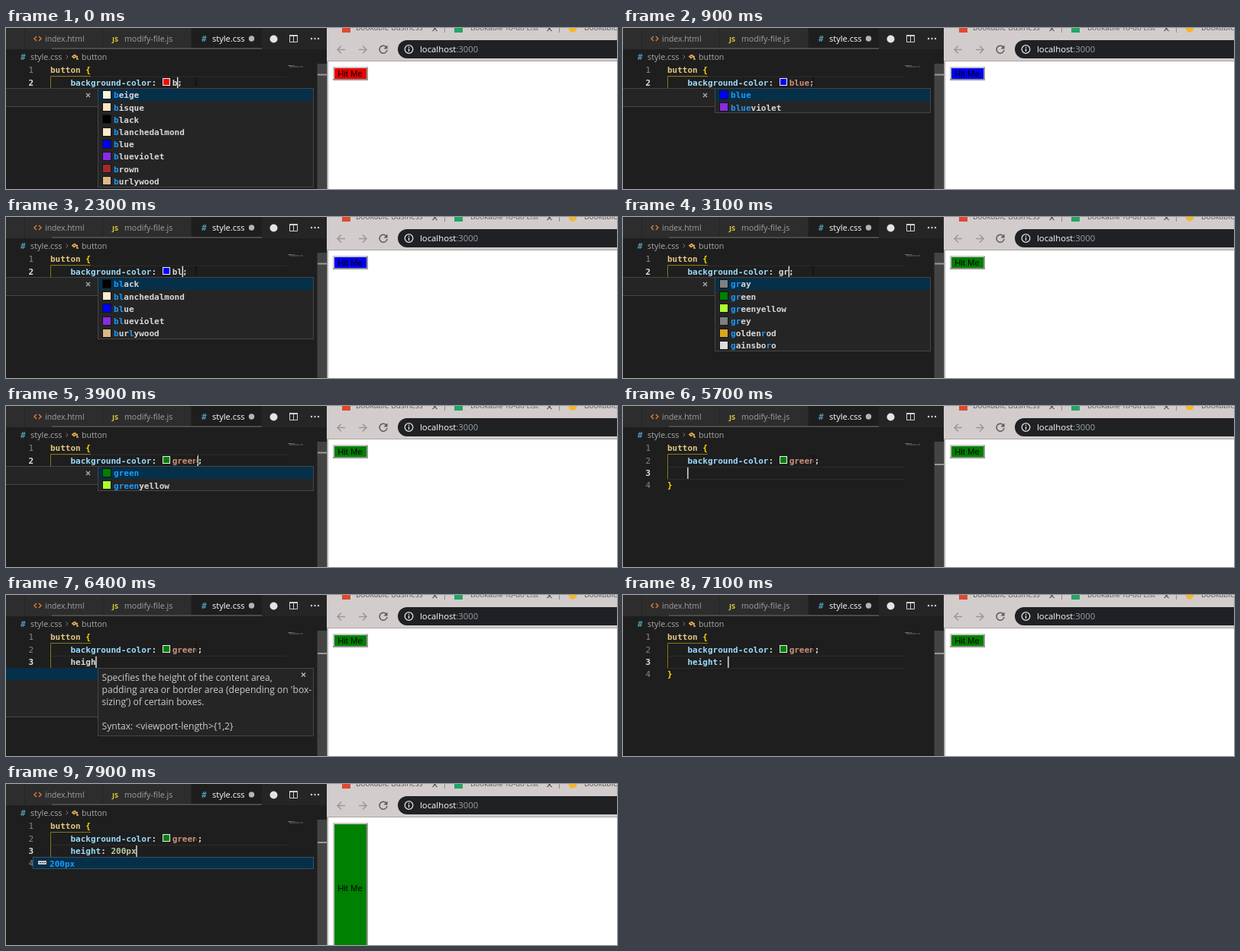
Recreate the animation shown at these times as an HTML page. Size 800x212 px, loop 8000 ms.

```html
<!DOCTYPE html>
<html lang="en">
<head>
<meta charset="utf-8">
<title>Live style editing</title>
<style>
html, body { margin: 0; width: 800px; height: 212px; overflow: hidden; background: #1e1e1e; }
svg { display: block; }
text { white-space: pre; }
.ui { font-family: "Open Sans", "Noto Sans", sans-serif; font-size: 10.6px; }
.code { font-family: "DejaVu Sans Mono", "Noto Sans Mono", monospace; font-size: 11px; font-weight: bold; }
.num { font-family: "DejaVu Sans Mono", "Noto Sans Mono", monospace; font-size: 11px; }
.page { font-family: "Liberation Sans", Arial, sans-serif; font-size: 11.33px; }
</style>
</head>
<body>
<svg id="stage" width="800" height="212" viewBox="0 0 800 212"></svg>
<script>
const LOOP = 8000, CHAR = 6.62, ROW = 16.2, LEFT = 58, INDENT = LEFT + 4 * CHAR;
const C = { plain: '#d8d8d8', prop: '#9cdcfe', value: '#ce9178', number: '#b5cea8', selector: '#e2c583',
  brace: '#ffd700', match: '#1a9bfb', widget: '#252526', edge: '#454545', selected: '#062f4a',
  toolbar: '#d2cdcc', address: '#202124' };

// Tracks: [start in ms, value]
const colorText = [[0, 'b'], [100, 'bl'], [300, 'blu'], [400, 'blue'], [2000, 'blu'], [2200, 'bl'], [2500, 'b'],
  [2800, ''], [2900, 'g'], [3100, 'gr'], [3300, 'gre'], [3400, 'gree'], [3600, 'green']];
const heightText = [[0, null], [5600, ''], [5900, 'h'], [6000, 'he'], [6200, 'hei'], [6300, 'heig'], [6400, 'heigh'],
  [6500, 'height'], [6700, 'height:'], [6900, 'height: '], [7400, 'height: 2'], [7500, 'height: 20'],
  [7600, 'height: 200'], [7700, 'height: 200p'], [7800, 'height: 200px']];
const swatchColor = [[0, 'red'], [600, 'blue'], [2600, ''], [3700, 'green']];
const buttonColor = [[0, '#e80000'], [600, '#0000f0'], [2600, '#008000']];
const buttonHeight = [[0, 18], [7700, 172]];
const popupKind = [[0, 'colors'], [2800, ''], [2900, 'colors'], [4400, ''], [5900, 'property'], [6700, ''], [7700, 'unit']];
const caretLine = [[0, 2], [4600, 3], [5100, 2], [5600, 3]];

const suggestions = {
  b: 'beige bisque black blanchedalmond blue blueviolet brown burlywood',
  bl: 'black blanchedalmond blue blueviolet burlywood',
  blu: 'blue blueviolet',
  blue: 'blue blueviolet',
  g: 'gainsboro ghostwhite gold goldenrod gray green greenyellow grey',
  gr: 'gray green greenyellow grey goldenrod gainsboro',
  gre: 'green greenyellow grey',
  gree: 'green greenyellow',
  green: 'green greenyellow'
};
const propertyRows = { h: 7, he: 6, hei: 4, heig: 4, heigh: 4, height: 4 };

const entry = (track, t) => track.filter(k => k[0] <= t).pop();
const at = (track, t) => entry(track, t)[1];
const esc = s => s.replace(/&/g, '&amp;').replace(/</g, '&lt;').replace(/>/g, '&gt;');
const rect = (x, y, w, h, fill, more = '') => `<rect x="${x}" y="${y}" width="${w}" height="${h}" fill="${fill}" ${more}/>`;
const box = (x, y, w, h, fill, stroke) => rect(x + .5, y + .5, w - 1, h - 1, fill, `stroke="${stroke}"`);
const path = (d, stroke, width = 1) => `<path d="${d}" fill="none" stroke="${stroke}" stroke-width="${width}"/>`;
const disc = (x, y, r, fill, more = '') => `<circle cx="${x}" cy="${y}" r="${r}" fill="${fill}" ${more}/>`;
const text = (x, y, s, cls, fill, more = '') => `<text x="${x}" y="${y}" class="${cls}" fill="${fill}" ${more}>${esc(s)}</text>`;
const code = (x, y, s, fill) => text(x, y, s, 'code', fill);
const ui = (x, y, s, fill, size = 10.6, weight = 400) =>
  text(x, y, s, 'ui', fill, `style="font-size:${size}px;font-weight:${weight}"`);
const cross = (x, y, r, color) => path(`M${x - r} ${y - r}l${2 * r} ${2 * r}m0 ${-2 * r}l${-2 * r} ${2 * r}`, color, 1.2);
const lineTop = n => 47.5 + (n - 1) * ROW;
const baseline = n => lineTop(n) + 11.8;

function editorHeader() {
  return rect(0, 0, 420, 28, C.widget) + rect(0, 0, 334, 28, '#2d2d2d') + rect(243, 0, 92, 28, '#1e1e1e') +
    path('M24.5 0V28M126.5 0V28M242.5 0V28', '#252526') + rect(60, 26, 275, 2, '#4b4b4b') +
    path('M40 11l-3 3l3 3M43 11l3 3l-3 3', '#e37933', 1.4) + ui(51, 17.5, 'index.html', '#a0a0a0', 10.4) +
    ui(139, 17.5, 'JS', '#d8cc3c', 9.2, 700) + ui(155, 17.5, 'modify-file.js', '#a0a0a0') +
    code(256, 18, '#', '#519aba') + ui(270, 17.5, 'style.css', '#ffffff', 11.1) + disc(321.5, 14, 3.7, '#b4b4b4') +
    disc(350.5, 14.5, 5, '#e4e4e4') +
    path('M371.5 9.5h10v9h-10zM376.5 9.5v9', '#d0d0d0') + rect(371, 9, 11, 2, '#d0d0d0') +
    [400, 404.5, 409].map(x => disc(x, 14, 1.2, '#d0d0d0')).join('') +
    code(19, 42, '#', '#519aba') + ui(32, 41.5, 'style.css', '#a9a9a9', 10.8) +
    path('M78.5 35.5l2.5 2.5l-2.5 2.5', '#777') +
    path('M87 37.5l3-2l2 2l-3 2zM91 37.5h3M93 37.5v3.5h2', '#e8ab53', 1.6) + ui(99, 41.5, 'button', '#a9a9a9');
}

function editorSide(line, matching) {
  return rect(369, 49, 6, 1, '#76705c') + rect(376, 49, 2, 1, '#666') + rect(371, 50.5, 13, 1, '#5e6870') +
    rect(385, 50.5, 4, 1, '#70594d') +
    rect(407.5, 47, 12.5, 165, '#434343') +
    (matching ? rect(410, 47, 4, 15, '#a0a0a0') + rect(410, 77, 4, 15, '#a0a0a0') : '') +
    rect(408, 45 + 15.5 * (line - 1), 12, 2, '#999');
}

function codeLines(t) {
  const value = at(colorText, t), extra = at(heightText, t), swatch = at(swatchColor, t), line = at(caretLine, t);
  const last = extra === null ? 3 : 4, matching = line === last;
  const complete = value === 'blue' || value === 'green';
  const valueX = INDENT + 18 * CHAR + (swatch ? 14 : 0);
  let out = editorSide(line, matching);
  out += path(`M${LEFT} ${lineTop(line) + .5}H368M${LEFT} ${lineTop(line + 1) + .5}H368`, '#2d2d2d');
  out += path(`M111 63.5H58.5V${lineTop(last)}`, '#85771a');
  for (let n = 1; n <= last; n++) {
    const current = n === line;
    out += text(29.5, baseline(n), String(n), current ? 'code' : 'num', current ? '#e0e0e0' : '#858585');
  }
  if (matching) out += box(104, 47, 8, 16, '#3c3a20', '#999') + box(58, Math.round(lineTop(last)), 7, 16, '#3c3a20', '#999');
  out += code(LEFT, baseline(1), 'button', C.selector) + code(LEFT + 7 * CHAR, baseline(1), '{', C.brace);
  out += code(INDENT, baseline(2), 'background-color', C.prop) + code(INDENT + 16 * CHAR, baseline(2), ':', C.plain);
  if (swatch) out += box(205, 66, 10, 10, swatch, '#eee');
  out += code(valueX, baseline(2), value, complete ? C.value : C.plain);
  out += code(valueX + value.length * CHAR, baseline(2), ';', C.plain);
  if (extra) {
    const [name, size] = extra.split(': ');
    out += code(INDENT, baseline(3), name.replace(':', ''), name.startsWith('height') ? C.prop : C.plain);
    if (extra.includes(':')) out += code(INDENT + 6 * CHAR, baseline(3), ':', C.plain);
    if (size) out += code(INDENT + 8 * CHAR, baseline(3), size, C.number);
  }
  out += code(LEFT, baseline(last), '}', C.brace);

  const touched = Math.max(...[colorText, heightText, caretLine].map(k => entry(k, t)[0]));
  if ((t - touched) % 1000 < 500) {
    let x = valueX + value.length * CHAR;
    if (line === 3) x = extra === null ? LEFT : INDENT + extra.length * CHAR;
    else if (t >= 5100) x += CHAR;
    out += rect(x - .3, lineTop(line) + 1, 1.4, 15, '#e8e8e8');
  }
  return out;
}

// Highlights typed letters in order inside the suggested word
function fuzzy(word, typed, x, y) {
  let i = 0;
  const spans = [...word].map(c => {
    const hit = c === typed[i];
    if (hit) i++;
    return `<tspan fill="${hit ? C.match : C.plain}">${c}</tspan>`;
  }).join('');
  return `<text x="${x}" y="${y}" class="code">${spans}</text>`;
}

function colorPopup(typed) {
  const names = suggestions[typed].split(' ');
  let out = box(-1, 79, 122, 25, C.widget, C.edge) + cross(107.5, 88.5, 2.5, '#b0b0b0');
  out += box(120, 79, 283, Math.round(names.length * ROW) + 1, C.widget, C.edge) + rect(121, 80, 281, 16, C.selected);
  names.forEach((name, i) => {
    const y = 80 + i * ROW;
    out += box(126, Math.round(y) + 2, 12, 12, name, '#151515') + fuzzy(name, typed, 141, y + 12.4);
  });
  return out;
}

function propertyPopup(typed) {
  const lines = ['Specifies the height of the content area,', "padding area or border area (depending on 'box-",
    "sizing') of certain boxes.", '', 'Syntax: <viewport-length>{1,2}'];
  return box(-1, 96, 122, Math.round(propertyRows[typed] * ROW), C.widget, C.edge) + rect(0, 96, 121, 16, C.selected) +
    box(120, 96, 283, 90, C.widget, C.edge) + cross(389.5, 105, 2.5, '#c0c0c0') +
    lines.map((s, i) => ui(125.5, 112.5 + i * ROW, s, '#cccccc', 12.1)).join('');
}

function unitPopup(typed) {
  return box(35, 96, 368, 16, C.selected, '#35506a') + rect(42, 101, 11, 5, '#c5c5c5') +
    path('M44 103.5h2M47 103.5h2M50 103.5h2', '#3a4a58') + fuzzy('200px', typed, 57, 108.5);
}

function popup(t) {
  const kind = at(popupKind, t);
  if (kind === 'colors') return colorPopup(at(colorText, t));
  if (kind === 'property') return propertyPopup(at(heightText, t));
  return kind === 'unit' ? unitPopup(at(heightText, t).split(': ')[1]) : '';
}

function browserFrame() {
  const dark = '#5a5a5c', faint = '#9c9898';
  return rect(420, 0, 380, 212, '#fff') + rect(420, 0, 380, 43, C.toolbar) + rect(420, 43, 380, 1, '#a9a5a4') +
    rect(420, 44, 1.5, 168, '#8a8a8a') + rect(421.5, 44, 1.5, 168, '#e4e4e4') +
    rect(440, 0, 11, 6, '#e0492f') + ui(458, 3, 'Bookable Business', dark, 10) + cross(561.5, 1, 3, dark) +
    path('M574.5 0V6M724.5 0V6', '#8f8b8a') +
    rect(587, 0, 11, 6, '#23a566') + ui(608, 3, 'Bookable To-do List', dark, 9.8) + cross(711.5, 1, 3, dark) +
    disc(742, 0, 5.5, '#f2b72b') + ui(757, 3, 'Bookable', dark, 10) +
    path('M444 28.5h-10m5-5l-5 5l5 5M462 28.5h10m-5-5l5 5l-5 5', faint, 1.5) +
    path('M498.2 25.5a5 5 0 1 0 .8 3.5', dark, 1.5) + `<path d="M499.5 22.5v5h-5z" fill="${dark}"/>` +
    rect(513, 16, 310, 24, C.address, 'rx="12"') + disc(527.5, 28, 5.3, 'none', 'stroke="#e0e0e0" stroke-width="1.3"') +
    rect(526.8, 27, 1.4, 4, '#e0e0e0') + rect(526.8, 24.7, 1.4, 1.4, '#e0e0e0') +
    '<text x="542" y="32" class="ui" style="font-size:11.3px" fill="#fff">localhost<tspan fill="#9aa0a6">:3000</tspan></text>';
}

function pageButton(t) {
  const top = 51, h = at(buttonHeight, t), bottom = top + h;
  return rect(428, top, 46, h, at(buttonColor, t)) +
    path(`M429 ${bottom}V${top + 1}H474`, '#c8c8c8', 2) + path(`M473 ${top + 1}V${bottom - 1}H428`, '#959595', 2) +
    text(450.5, top + h / 2 + 4.3, 'Hit Me', 'page', '#000', 'text-anchor="middle"');
}

const pointer = path('M247 65.5h1.5l.5.5l.5-.5h1.5M249 66v9M247 75.5h1.5l.5-.5l.5.5h1.5', '#101010', 1.2);
const backdrop = rect(0, 0, 420, 212, '#1e1e1e') + editorHeader() + browserFrame();
const stage = document.getElementById('stage');
let shown = -1;

function draw(now) {
  const t = Math.floor((now % LOOP) / 100) * 100;
  if (t !== shown) {
    shown = t;
    stage.innerHTML = backdrop + codeLines(t) + popup(t) + pointer + pageButton(t);
  }
  requestAnimationFrame(draw);
}
draw(0);
</script>
</body>
</html>
```
